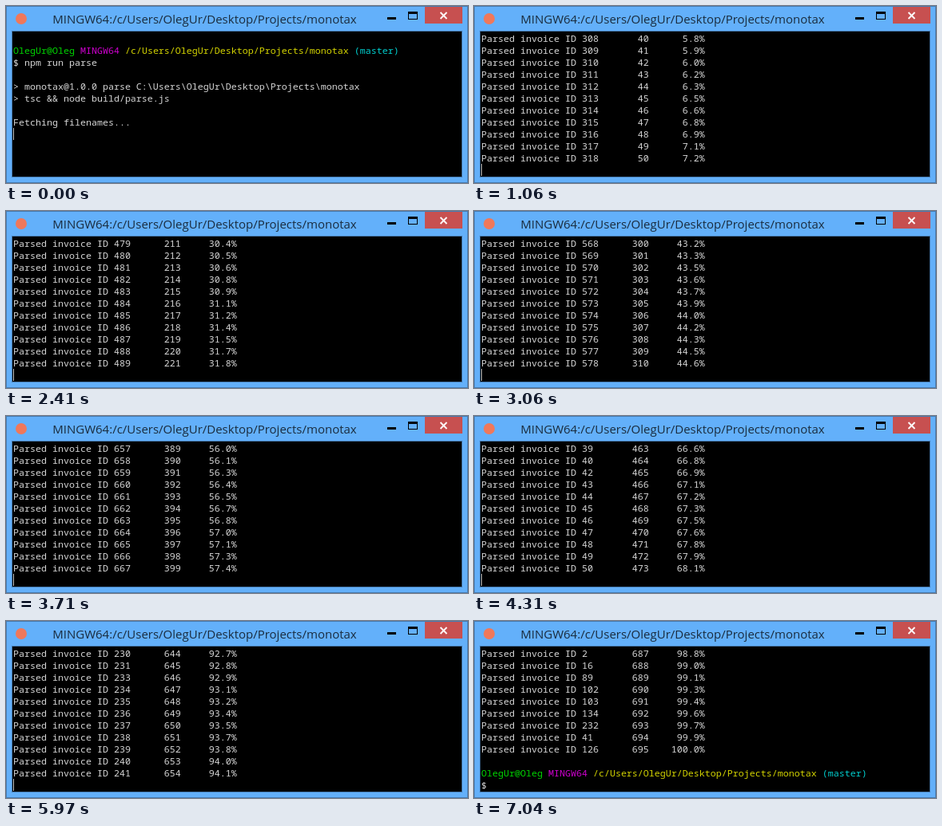
These frames come from a looping animation (578 by 222 pixels, 7140 ms). An HTML page:

```html
<!DOCTYPE html>
<html lang="en">
<head>
<meta charset="utf-8">
<title>Terminal</title>
<style>
html, body { margin: 0; width: 100%; height: 100%; overflow: hidden; background: #63b0fa; }
svg { position: absolute; left: 0; top: 0; }
svg text { font: 15px "Open Sans", sans-serif; fill: #1a2c3e; }
pre {
  position: absolute; left: 9px; top: 33px; margin: 0; color: #d6d6d6;
  font: 11.667px/15px "Noto Sans Mono", monospace;
  font-variant-ligatures: none;
}
#cursor { position: absolute; width: 1px; height: 15px; background: #bfbfbf; }
.user { color: #00d400; }
.system { color: #d000d0; }
.path { color: #d4d400; }
.branch { color: #00d0d0; }
</style>
</head>
<body>
<svg width="578" height="222">
  <rect x=".5" y=".5" width="577" height="221" fill="#63b0fa" stroke="#467bb0"/>
  <rect x="7.5" y="31.5" width="563" height="183" stroke="#467bb0"/>
  <circle cx="19" cy="16" r="7" fill="#f0785a"/>
  <text x="58.2" y="22">MINGW64:/c/Users/OlegUr/Desktop/Projects/monotax</text>
  <path d="M477 14h11v3h-11z"/>
  <path d="M503 7h12v10h-12zM504 10v6h10v-6z" fill-rule="evenodd"/>
  <rect x="524" y="1" width="47" height="21" fill="#c75050"/>
  <path d="M543.5 8l8 8m0-8l-8 8" stroke="#fff" stroke-width="1.8"/>
</svg>
<pre id="screen"></pre>
<div id="cursor"></div>
<script>
const LOOP = 7140, TOTAL = 695, ROWS = 12, LINE = 15;
const START = 640, DONE = 6530;

const prompt = '<span class="user">OlegUr@Oleg</span> <span class="system">MINGW64</span> ' +
  '<span class="path">/c/Users/OlegUr/Desktop/Projects/monotax</span> <span class="branch">(master)</span>';
const intro = ['', prompt, '$ npm run parse', '',
  '&gt; monotax@1.0.0 parse C:\\Users\\OlegUr\\Desktop\\Projects\\monotax',
  '&gt; tsc &amp;&amp; node build/parse.js', '', 'Fetching filenames...'];

// Invoices come in order from 269, wrap round to 1, and the late ones finish last.
const late = [27, 63, 78, 117, 150, 2, 16, 89, 102, 103, 134, 232, 41, 126];
const ids = Array.from({ length: TOTAL }, (_, i) => (i + 268) % TOTAL + 1)
  .filter(id => !late.includes(id)).concat(late);

const parsed = ids.map((id, i) => {
  const percent = ((i + 1) / TOTAL * 100).toFixed(1) + '%';
  return `Parsed invoice ID ${id}`.padEnd(24) + String(i + 1).padStart(6) + percent.padStart(10);
});

// Screen refreshes arrive in bursts of 16.
const bursts = [START, 1390, 2130, 2870, 3620, 4360, 5100, 5840, 6580];
// Pairs of refresh number and invoices parsed by then.
const progress = [[-1, 0], [9, 50], [38, 221], [66, 399], [79, 473], [99, 572], [123, TOTAL]];

function refreshAt(t) {
  const next = bursts.findIndex(b => b > t);
  const from = bursts[next - 1];
  const inBurst = Math.floor((t - from + 9) / (bursts[next] - from) * 16);
  return Math.min(16 * (next - 1) + Math.min(inBurst, 15), 123);
}

function parsedCount(t) {
  if (t < START) return 0;
  if (t >= DONE) return TOTAL;
  const k = refreshAt(t);
  const i = progress.findIndex(p => p[0] >= k);
  const [k0, n0] = progress[i - 1], [k1, n1] = progress[i];
  return Math.round(n0 + (n1 - n0) * (k - k0) / (k1 - k0));
}

const screenEl = document.getElementById('screen');
const cursorEl = document.getElementById('cursor');

function draw(now) {
  const t = now % LOOP, done = t >= DONE;
  const lines = [...intro, ...parsed.slice(0, parsedCount(t)), ...(done ? ['', prompt, '$ '] : [''])].slice(-ROWS);
  const html = lines.join('\n');
  if (html !== draw.last) screenEl.innerHTML = draw.last = html;
  cursorEl.style.left = (done ? 23 : 9) + 'px';
  cursorEl.style.top = 33 + (lines.length - 1) * LINE + 'px';
  cursorEl.hidden = (t >= 310 && t < START) || t >= 7040;
  requestAnimationFrame(draw);
}
requestAnimationFrame(draw);
</script>
</body>
</html>
```
